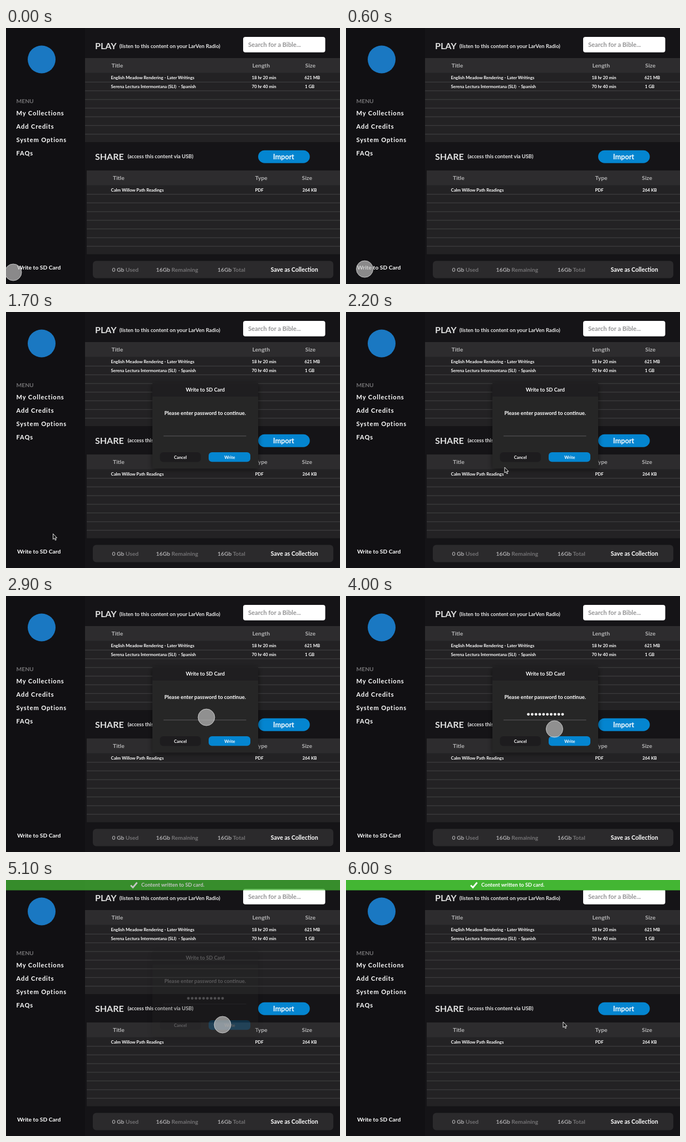
These frames come from a looping animation (600 px wide and 460 px high, 6100 ms). An HTML page:

```html
<!DOCTYPE html>
<html lang="en">
<head>
<meta charset="utf-8">
<title>Write to SD card</title>
<style>
  html, body { margin: 0; width: 100%; height: 100%; overflow: hidden; background: #111013; }
  svg { display: block; width: 600px; height: 460px; }
  text { font: 700 10.3px Lato, "Open Sans", sans-serif; fill: #fff; white-space: pre; }
  .mid { text-anchor: middle; }
  .head { font-size: 16px; fill: #e2e2e2; }
  .sub { font-size: 9.35px; fill: #e6e6e6; }
  .col { fill: #b4b4b5; }
  .row { font-size: 7.8px; }
  .menu { font-size: 11.1px; letter-spacing: .9px; }
  .small { font-size: 7.7px; }
  .dim { fill: #747375; }
  .soft { fill: #a9a8aa; }
  .blue { fill: #0485d0; }
</style>
</head>
<body>
<svg viewBox="0 0 600 460">
  <defs>
    <filter id="shadow" x="-20%" y="-20%" width="140%" height="140%">
      <feDropShadow dx="0" dy="2" stdDeviation="5" flood-color="#000" flood-opacity=".55"/>
    </filter>
  </defs>

  <rect width="600" height="460" fill="#151417"/>
  <rect width="142" height="460" fill="#111013"/>

  <circle cx="64" cy="56.5" r="25" fill="#1a78c2"/>
  <text x="18.5" y="134.8" class="dim">MENU</text>
  <text x="18.5" y="156.5" class="menu">My Collections</text>
  <text x="18.5" y="180.6" class="menu">Add Credits</text>
  <text x="18.5" y="204.7" class="menu">System Options</text>
  <text x="18.5" y="228.8" class="menu">FAQs</text>
  <text x="20" y="433.5">Write to SD Card</text>

  <text x="160" y="38" class="head">PLAY</text>
  <text x="203.8" y="36.4" class="sub">(listen to this content on your LarVen Radio)</text>
  <rect x="426" y="16" width="147.5" height="27.7" rx="4" fill="#fff"/>
  <text x="435" y="33.8" style="font-size:11.2px;fill:#949495">Search for a Bible...</text>

  <rect x="142" y="54" width="458" height="151" fill="#232224"/>
  <rect x="142" y="54" width="458" height="26.5" fill="#2d2c2e"/>
  <g id="playLines" stroke="#39383a" stroke-width="1.5"></g>
  <text x="189.5" y="71.2" class="col">Title</text>
  <text x="442.5" y="71.2" class="col">Length</text>
  <text x="537.5" y="71.2" class="col">Size</text>
  <text x="188.5" y="92.3" class="row">English Meadow Rendering - Later Writings</text>
  <text x="441.5" y="92.3" class="row">18 hr 20 min</text>
  <text x="536.2" y="92.3" class="row">621 MB</text>
  <text x="188.5" y="107.8" class="row">Serena Lectura Intermontana (SLI)  - Spanish</text>
  <text x="441.5" y="107.8" class="row">70 hr 40 min</text>
  <text x="537" y="107.8" class="row">1 GB</text>

  <text x="160" y="236.8" class="head">SHARE</text>
  <text x="218.4" y="234.4" class="sub">(access this content via USB)</text>
  <rect x="453" y="219.7" width="92.7" height="23" rx="11.5" class="blue"/>
  <text x="498.8" y="235.5" class="mid" style="font-size:12.6px">Import</text>

  <rect x="145" y="256" width="455" height="150.5" fill="#232224"/>
  <rect x="145" y="256" width="455" height="26.5" fill="#2d2c2e"/>
  <g id="shareLines" stroke="#39383a" stroke-width="1.5"></g>
  <text x="192" y="272.8" class="col">Title</text>
  <text x="447.5" y="272.8" class="col">Type</text>
  <text x="531.5" y="272.8" class="col">Size</text>
  <text x="188.5" y="294.3" class="row">Calm Willow Path Readings</text>
  <text x="447.5" y="294.3" class="row">PDF</text>
  <text x="532.5" y="294.3" class="row">264 KB</text>

  <rect x="156" y="418.5" width="432" height="31" rx="6" fill="#2b2a2c"/>
  <text x="190.5" y="437.7" class="soft">0 Gb <tspan class="dim">Used</tspan></text>
  <text x="269.5" y="437.7" class="soft">16Gb <tspan class="dim">Remaining</tspan></text>
  <text x="380" y="437.7" class="soft">16Gb <tspan class="dim">Total</tspan></text>
  <text x="475.5" y="437.7" style="font-size:10.6px">Save as Collection</text>

  <g id="dialog">
    <rect x="263" y="128" width="190" height="153" fill="#262527" filter="url(#shadow)"/>
    <rect x="263" y="128" width="190" height="24" fill="#1f1e20"/>
    <text x="358" y="143.2" class="mid" style="font-size:9.2px">Write to SD Card</text>
    <text x="357.7" y="185" class="mid" style="font-size:9.45px">Please enter password to continue.</text>
    <path d="M283 222.7H431.5" stroke="#49484a" stroke-width="1.6"/>
    <g id="dots" fill="#fff"></g>
    <rect x="276.5" y="252" width="73.5" height="17.5" rx="6" fill="#1d1c1e"/>
    <text x="313.2" y="263.5" class="mid small">Cancel</text>
    <rect x="364" y="252" width="75" height="17.2" rx="6" class="blue"/>
    <text x="402" y="263.5" class="mid small">Write</text>
  </g>

  <g id="banner">
    <rect width="600" height="18.5" fill="#43b633"/>
    <path d="M224 9.5L228 13.5L235.5 4.5" fill="none" stroke="#fff" stroke-width="2.8"/>
    <text x="243" y="12.3" style="font-size:9.3px">Content written to SD card.</text>
  </g>

  <g id="pointer">
    <circle id="touch" r="15" fill="#bebebe" fill-opacity=".7" stroke="#d6d6d6" stroke-opacity=".85"/>
    <path id="arrow" transform="translate(1 -5)" d="M0 0V10L2.3 8L4 11.7L5.6 11L4 7.4H7Z"
          fill="#111" stroke="#fff" stroke-width=".9"/>
  </g>
</svg>
<script>
  const LOOP = 6100, STEP = 100;
  const $ = id => document.getElementById(id);
  const clamp = v => Math.min(1, Math.max(0, v));
  const easeOut = p => 1 - (1 - p) ** 2;
  const easeInOut = p => p * p * (3 - 2 * p);
  const linear = p => p;

  function add(parent, tag, attrs) {
    const el = document.createElementNS('http://www.w3.org/2000/svg', tag);
    for (const k in attrs) el.setAttribute(k, attrs[k]);
    return parent.appendChild(el);
  }

  for (let i = 0; i < 7; i++) {
    const dy = i * 15.6;
    add($('playLines'), 'path', { d: `M142 ${97.2 + dy}H600` });
    add($('shareLines'), 'path', { d: `M145 ${298.7 + dy}H600` });
  }
  const dots = Array.from({ length: 10 }, (_, i) =>
    add($('dots'), 'circle', { cx: 327.6 + i * 6.83, cy: 212.6, r: 2.4 }));

  // time, x, y, easing towards this point
  const path = [
    [0, 13, 439, linear],
    [700, 34, 433, easeOut],
    [1500, 34, 433, linear],
    [2200, 284, 284, easeInOut],
    [2700, 360, 218, easeInOut],
    [3700, 360, 218, linear],
    [4300, 389, 260, easeInOut],
    [LOOP, 389, 260, linear]
  ];
  const arrowSpans = [[1600, 2300], [5400, LOOP]];

  function pointerAt(t) {
    const i = path.findIndex(k => k[0] > t);
    const [t0, x0, y0] = path[i - 1], [t1, x1, y1, ease] = path[i];
    const p = ease((t - t0) / (t1 - t0));
    return [x0 + (x1 - x0) * p, y0 + (y1 - y0) * p];
  }

  const fade = (t, start) => easeOut(clamp((t - start) / 300));

  function draw(t) {
    const [x, y] = pointerAt(t);
    const isArrow = arrowSpans.some(([a, b]) => t >= a && t < b);
    const saved = fade(t, 4950);
    const typed = Math.floor((t - 2920) / 80);

    $('pointer').setAttribute('transform', `translate(${x} ${y})`);
    $('arrow').style.display = isArrow ? '' : 'none';
    $('touch').style.display = isArrow ? 'none' : '';
    $('dialog').style.opacity = fade(t, 1130) * (1 - saved);
    $('banner').style.opacity = saved;
    dots.forEach((d, i) => d.style.display = i < typed ? '' : 'none');
  }

  const start = performance.now();
  function tick() {
    const t = (performance.now() - start) % LOOP;
    draw(Math.floor(t / STEP) * STEP);
    requestAnimationFrame(tick);
  }
  tick();
</script>
</body>
</html>
```
